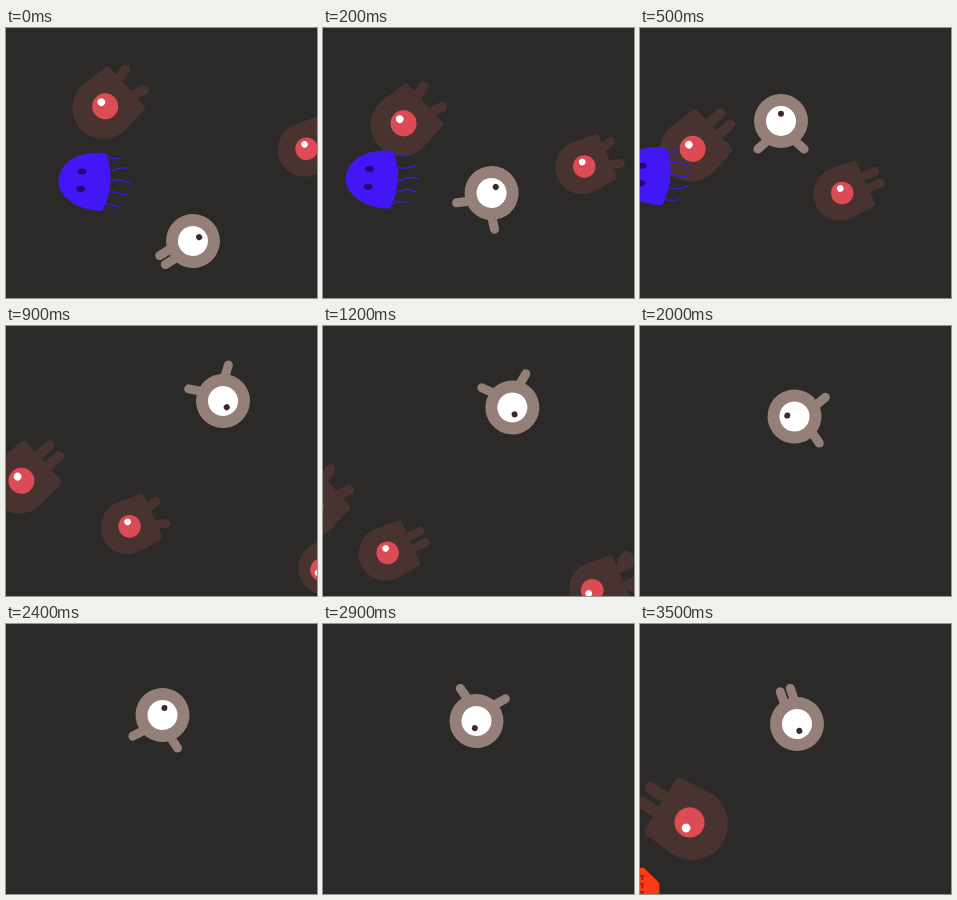
Recreate the animation shown at these times as an HTML page with a canvas. Size 311x270 px, loop 3.6 s.

```html
<!DOCTYPE html>
<html lang="en">
<head>
<meta charset="utf-8">
<title>Pond creatures</title>
<style>
  html, body { margin: 0; width: 100%; height: 100%; overflow: hidden; background: #2b2a28; }
  canvas { display: block; width: 311px; height: 270px; }
</style>
</head>
<body>
<canvas id="stage"></canvas>
<script>
const W = 311, H = 270, LOOP = 3600, STEP = 100, TAU = 2 * Math.PI;
const BROWN = '#483330', RED = '#dd4b54', SKIN = '#947f79', BLUE = '#4316f6';
const canvas = document.getElementById('stage');
const ctx = canvas.getContext('2d');
const dpr = window.devicePixelRatio || 1;
canvas.width = W * dpr;
canvas.height = H * dpr;

const rad = deg => deg * Math.PI / 180;
const clamp = v => Math.max(0, Math.min(1, v));
const wave = (t, period, peak) => clamp(0.5 + 0.9 * Math.cos(TAU * (t - peak) / period));
// Legs snap shut once per stroke and stay spread in between
const stroke = t => clamp(2.7 * (1 - Math.cos(TAU * t / 700)));

// Waypoints of the swimmer: time, x, y, heading in degrees
const route = [
  [0, 187, 213, -32],
  [500, 141, 93, -90],
  [600, 153, 50, -62],
  [900, 217, 75, 59],
  [1600, 152.5, 90, 90],
  [2400, 156.5, 91, 285],
  [2900, 153.5, 97, 463],
  [3500, 157, 100, 431]
];

function pose(t) {
  const i = Math.max(1, route.findIndex(k => k[0] >= t));
  const a = route[i - 1], b = route[i], f = (t - a[0]) / (b[0] - a[0]);
  return a.slice(1).map((v, j) => v + (b[j + 1] - v) * f);
}

function at(x, y, deg, scale, draw) {
  ctx.save();
  ctx.translate(x, y);
  ctx.rotate(rad(deg));
  ctx.scale(scale, scale);
  draw();
  ctx.restore();
}

function blob(x, y, rx, ry, color) {
  ctx.fillStyle = color;
  ctx.beginPath();
  ctx.ellipse(x, y, rx, ry, 0, 0, TAU);
  ctx.fill();
}
const disc = (x, y, r, color) => blob(x, y, r, r, color);

// Pair of legs pointing along +x
function legs(hipX, hipY, length, spread, width, color) {
  const dx = length * Math.cos(rad(spread)), dy = length * Math.sin(rad(spread));
  ctx.strokeStyle = color;
  ctx.lineWidth = width;
  ctx.lineCap = 'round';
  for (const side of [-1, 1]) {
    ctx.beginPath();
    ctx.moveTo(hipX, side * hipY);
    ctx.lineTo(hipX + dx, side * (hipY + dy));
    ctx.stroke();
  }
}

function leaf(side) {
  ctx.beginPath();
  ctx.moveTo(31, side * 5);
  ctx.quadraticCurveTo(30, side * 22, 50, side * 27);
  ctx.quadraticCurveTo(60, side * 12, 47, side * 5);
  ctx.fill();
}

// Travels straight ahead; (x, y) is its place at time t0, speed is px per 100 ms
function hunter(t, { t0, x, y, dir, speed, scale, period, peak, leafy }) {
  const way = speed * (t - t0) / 100;
  at(x + way * Math.cos(rad(dir)), y + way * Math.sin(rad(dir)), dir + 180, scale, () => {
    const open = wave(t, period, peak);
    ctx.fillStyle = BROWN;
    if (leafy) [-1, 1].forEach(leaf);
    else legs(23 - 4 * open, 7.3, 24, 16 * open, 10, BROWN);
    ctx.beginPath();
    ctx.arc(0, 0, 31, rad(90), rad(270));
    ctx.arcTo(32, -28.5, 32, 0, 4);
    ctx.arcTo(32, 28.5, 0, 31, 4);
    ctx.fill();
    const eyeX = leafy ? -5 : 2.5;
    disc(eyeX, 0, 13, RED);
    disc(leafy ? eyeX - 5 : eyeX, leafy ? 1.5 : -5.6, 3.8, '#fff');
  });
}

const hunters = [
  { t0: 0, x: 97.3, y: 80, dir: 137.6, speed: 12.6, scale: 1, period: 1400, peak: 0 },
  { t0: 0, x: 298.6, y: 121.7, dir: 155.8, speed: 21.56, scale: 0.87, period: 700, peak: 900 },
  { t0: 900, x: 319.5, y: 242, dir: 156, speed: 16.9, scale: 0.87, leafy: true },
  { t0: 3500, x: 52, y: 200, dir: 32, speed: 18.7, scale: 1.16, period: 1400, peak: 2800 }
];

function jelly(t) {
  at(52.4 - 0.148 * t, 153.2 - 0.0115 * t, 0, 1, () => {
    ctx.strokeStyle = '#3c1cd0';
    ctx.lineWidth = 1.4;
    for (let i = 0; i < 5; i++) {
      const bend = (i - 2) ** 2, reach = 74 - 3 * bend;
      ctx.beginPath();
      for (let x = 50 - bend; x < reach; x++) {
        ctx.lineTo(x, 12 * i - 24 + 1.4 * Math.sin(x / 4 + i * 1.3 - t / 110));
      }
      ctx.stroke();
    }
    ctx.fillStyle = BLUE;
    ctx.beginPath();
    ctx.moveTo(48, -27.5);
    ctx.bezierCurveTo(24, -32, 0, -20, 0, 0);
    ctx.bezierCurveTo(0, 18, 23, 30, 44, 29.5);
    ctx.quadraticCurveTo(58, 2, 48, -27.5);
    ctx.fill();
    blob(23.8, -9.8, 4.4, 3, '#1f0a78');
    blob(22.3, 7.8, 4.4, 3, '#1f0a78');
  });
}

function ember(t) {
  const k = (t - 3500) / 100;
  at(-7 + 13 * k, 270 + 3 * k, 0, 1, () => {
    ctx.fillStyle = '#fb3b14';
    ctx.beginPath();
    for (let i = 0; i < 8; i++) {
      const a = TAU * (i + 0.5) / 8;
      ctx.lineTo(28.5 * Math.cos(a), 28.5 * Math.sin(a));
    }
    ctx.fill();
    ctx.strokeStyle = '#8e1a0c';
    ctx.lineWidth = 1.4;
    ctx.beginPath();
    for (let x = -12; x < 16; x += 10) {
      for (let y = -18; y < 18; y += 8) {
        ctx.moveTo(x - 2, y);
        ctx.lineTo(x + 2, y);
        ctx.lineTo(x + 1, y + 4);
      }
    }
    ctx.stroke();
  });
}

function swimmer(t) {
  const [x, y, heading] = pose(t);
  at(x, y, heading + 180, 1, () => {
    legs(12, 5.3, 24, 48 * stroke(t), 9, SKIN);
    disc(0, 0, 27, SKIN);
    disc(0, 0, 15, '#fff');
    disc(-7.3, 0, 3, '#402828');
  });
}

function render(t) {
  ctx.setTransform(dpr, 0, 0, dpr, 0, 0);
  ctx.fillStyle = '#2b2a28';
  ctx.fillRect(0, 0, W, H);
  hunters.forEach((h, i) => {
    hunter(t, h);
    if (i === 0) jelly(t);
  });
  ember(t);
  swimmer(t);
}

const start = performance.now();
function tick() {
  const t = (performance.now() - start) % LOOP;
  render(Math.floor(t / STEP) * STEP);
  requestAnimationFrame(tick);
}
tick();
</script>
</body>
</html>
```
